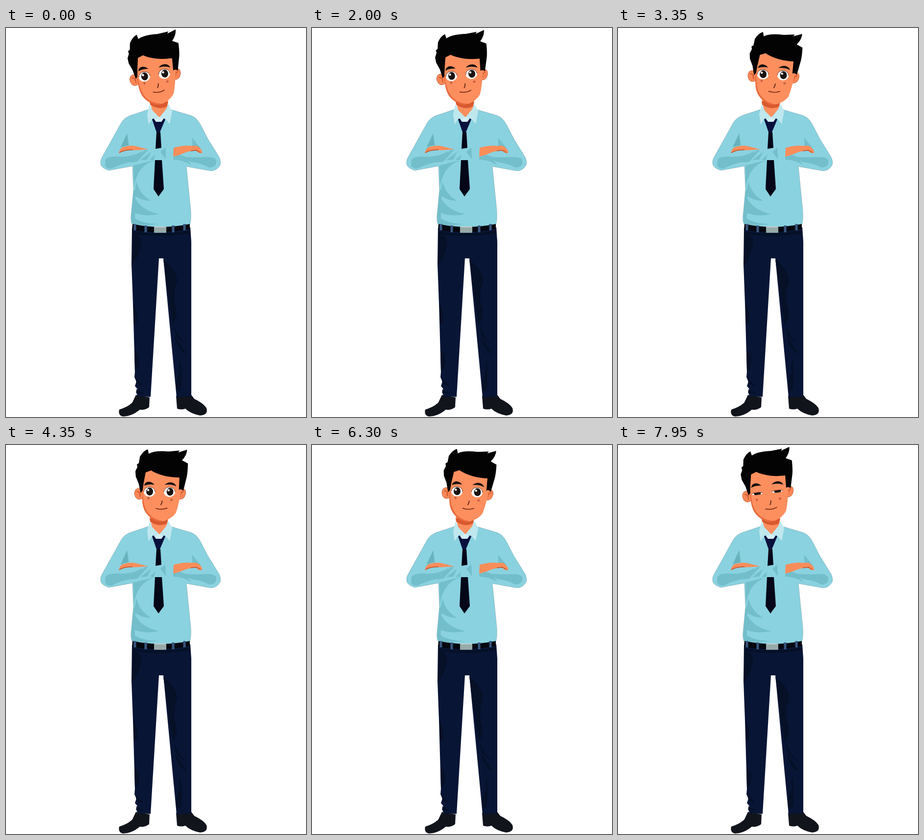
Animation of 612x792 px, one loop 8 s. Source, as an HTML page:

```html
<!DOCTYPE html>
<html lang="en">
<head>
<meta charset="utf-8">
<title>Man with crossed arms</title>
<style>
html, body { margin: 0; width: 100%; height: 100%; overflow: hidden; background: #fff; }
svg { display: block; width: 100%; height: 100%; }
</style>
</head>
<body>
<svg viewBox="0 0 612 792">
  <defs>
    <clipPath id="clipL"><ellipse class="lid" cx="292" cy="95.5" rx="11.5" ry="10"/></clipPath>
    <clipPath id="clipR"><ellipse class="lid" cx="333" cy="95.5" rx="11.5" ry="10"/></clipPath>
    <clipPath id="faceClip"><path d="M277 44V108C278 126 281 135 291 145C299 152 307 157 316 156C327 155 341 146 346 138C350 128 352 115 356 100V44Z"/></clipPath>
  </defs>

  <g id="shoes" fill="#12141c">
    <path d="M265 747L293 752L292 772Q283 779 273 777Q256 791 239 791Q228 789 231 777Q250 771 258 762Z"/>
    <path d="M347 749L378 747L384 755Q403 764 409 774Q413 788 396 789Q376 785 366 775Q358 778 349 775Z"/>
  </g>

  <g id="trousers">
    <path fill="#081535" d="M257 408L376 406L378 435V750L348 752L321 469H312L295 751L269 750L265 741L268 735L263 729L266 720L262 711L263 700L259 560L256 480Z"/>
    <g fill="#061026">
      <path d="M257 414Q315 424 376 412V418Q315 428 257 419Z"/>
      <path d="M257 419Q278 422 275 440Q270 470 257 482Z"/>
      <path d="M321 472Q350 495 349 517Q338 545 348 575Q350 592 340 604Z"/>
      <path d="M342 604Q348 625 365 642Q356 638 346 626Z"/>
      <path d="M345 628Q355 645 368 662Q360 664 347 640Z"/>
      <path d="M260 560Q270 575 267 600L261 602Z"/>
      <path d="M262 655Q276 668 270 690L263 700Z"/>
      <path d="M264 711Q272 722 280 727Q272 729 266 723ZM266 735Q272 740 282 743Q272 747 266 741Z"/>
      <path d="M347 740Q346 715 355 700Q352 685 356 675Q361 710 356 738Z"/>
    </g>
  </g>

  <g id="shirt">
    <path fill="#8ad2e0" stroke="#41636b" stroke-opacity=".45" stroke-width=".7" d="M290 166L254 178Q242 182 235 193L196 263Q191 271 194 280Q199 287 210 290L258 281L260 330L255 382Q254 393 257 399Q315 411 375 400Q378 393 377 372L368 282L418 291Q430 291 437 279Q439 272 435 263L412 226L397 197Q389 182 377 178L336 166Z"/>
    <g fill="#73becb">
      <path d="M233 244L247 214L251 239Q242 239 233 244Z"/>
      <path d="M380 240V223Q391 238 398 245Q390 241 380 240Z"/>
      <path d="M203 268Q210 260 232 262Q258 263 279 250L267 271Q240 274 216 286Q206 288 202 280Z"/>
      <path d="M254 274L283 249L290 248L268 272ZM274 269L296 252L288 268Z"/>
      <path d="M429 269Q424 261 402 263Q374 264 355 261L378 273Q402 276 414 284Q425 285 429 276Z"/>
      <path d="M341 263Q354 255 365 262L378 279Q360 268 341 268Z"/>
      <path d="M315 252L325 244L326 267ZM293 268L305 258L301 269Z"/>
      <path d="M260 280Q283 274 304 269Q277 278 268 300Q261 315 261 328Z"/>
      <path d="M266 312Q272 338 296 352Q276 352 261 340ZM263 345Q275 371 313 379Q282 385 261 376Z"/>
      <path d="M260 330H265Q262 370 263 388Q282 399 311 399Q278 404 257 398Q255 390 256 380Z"/>
    </g>
    <path fill="#67b2bd" d="M235 242L247 216L249 239Z"/>
    <g fill="#f98d5a">
      <path d="M230 255Q232 244 240 242Q256 237 270 242L290 247Q266 249 251 249Q240 250 230 255Z"/>
      <path d="M342 244Q360 238 380 240Q390 238 396 245Q401 250 400 255L393 254L386 249Q367 252 355 258L341 262Z"/>
    </g>
    <path d="M231 254Q240 248 258 248M377 250L389 249L397 254" fill="none" stroke="#b54f2c" stroke-width="1.4"/>
  </g>

  <g id="belt">
    <path fill="#05070f" d="M258 399Q315 411 375 399V409Q315 421 257 411Z"/>
    <rect x="302" y="404" width="25" height="13" rx="1" fill="#97aaa8"/>
    <path d="M303 405H326" stroke="#c0cecb" stroke-width="2"/>
    <path d="M263 399V412M285 402V416M341 402V416M364 399V412" stroke="#39577f" stroke-width="5"/>
  </g>

  <path fill="#fd8f5f" d="M293 146L331 146L329 163L313 183L298 168Z"/>
  <path fill="#d9592f" d="M293 149L331 150L328 160Q312 168 294 156Z"/>

  <g id="head">
    <g fill="#fd8655" stroke="#8a3b22" stroke-width=".6">
      <path d="M278 91Q270 86 264 91Q259 98 264 107Q269 114 278 109Z"/>
      <path d="M351 91Q359 85 365 91Q368 97 363 106Q358 112 350 109Z"/>
    </g>
    <path d="M266 95Q274 95 273 106M362 94Q355 96 355 105" fill="none" stroke="#c5552e" stroke-width="1.8"/>
    <g clip-path="url(#faceClip)">
      <path fill="#e9693c" d="M270 40H360V162H270Z"/>
      <path fill="#fd8f5f" d="M277 40H360V150Q330 160 316 154Q299 151 289 138Q280 126 279 104Z"/>
    </g>
    <path fill="#030304" d="M274 98L270 79L264 65L263 54L267 45L266 40L270 37L272 24Q279 12 288 9L290 18Q302 11 330 13L353 11L350 15L368 9Q368 20 358 31L370 37Q370 53 368 64L361 93Q357 88 352 91L353 66Q337 66 323 63Q304 58 295 52Q290 54 284 56L280 78L278 93Z"/>
    <path fill="#17100f" d="M281 83Q283 75 291 75Q298 76 302 81Q291 79 281 83ZM323 81Q330 75 337 76Q344 77 347 84Q336 79 323 81Z"/>
    <g id="eyes">
      <g clip-path="url(#clipL)">
        <path fill="#fff" d="M279 85H305V106H279Z"/>
        <ellipse cx="292.5" cy="95" rx="7" ry="8" fill="#1b1312"/>
        <circle cx="289.5" cy="92" r="2.3" fill="#fff"/>
      </g>
      <g clip-path="url(#clipR)">
        <path fill="#fff" d="M320 85H346V106H320Z"/>
        <ellipse cx="334" cy="95" rx="7" ry="8" fill="#1b1312"/>
        <circle cx="331" cy="92" r="2.3" fill="#fff"/>
      </g>
      <path class="lash" fill="none" stroke="#5a2618" stroke-width=".9"/>
      <path class="lash" fill="none" stroke="#5a2618" stroke-width=".9"/>
    </g>
    <path d="M318 113Q318 119 315 122" fill="none" stroke="#5c2014" stroke-width="1.8"/>
    <path d="M305 129Q318 133 329 128" fill="none" stroke="#7a2917" stroke-width="1.7"/>
    <path d="M287 108L291 107L289 112M290 109L292 110M335 110L337 114M339 109L335 113M338 111L340 113" fill="none" stroke="#a9482b" stroke-width="1.1"/>
  </g>

  <g id="collar" fill="#bfe8ee">
    <path d="M293 155L299 168L313 182L304 187L299 184L291 196L288 176Z"/>
    <path d="M331 154L327 165L313 182L320 187L324 184L334 195L339 169Z"/>
  </g>
  <g id="tie">
    <path fill="#d3f0f4" d="M302 187L313 181L321 187L317 192H306Z"/>
    <path fill="#07113c" d="M298 186L301 184L306 191H317L322 184L325 186L314 212H307Z"/>
    <path fill="#030718" d="M307 212H315L317 244L305 246ZM304 269H318L322 328L311 343L301 328Z"/>
  </g>
</svg>
<script>
const LOOP = 8000, STEP = 50, SWAY = 2950;
const head = document.getElementById('head');
const lids = document.querySelectorAll('.lid');
const lashes = document.querySelectorAll('.lash');

const clamp = v => Math.max(0, Math.min(1, v));
const ease = (t, a, b) => (1 - Math.cos(Math.PI * clamp((t - a) / (b - a)))) / 2;

// Quick tilt to the right, slow return, short rest on the left.
function tilt(p) {
  const s = ease(p, -100, 520) - ease(p, 800, 2500) + ease(p, SWAY - 100, SWAY + 520);
  return (-2 + 35 * s - 22) * 0.358;
}

function blink(p, start) {
  const d = p - start;
  return d < 0 ? 1 : Math.max(clamp(1 - d / 55), clamp((d - 80) / 100));
}

function render(t) {
  const p = t % SWAY;
  head.setAttribute('transform', `rotate(${tilt(p)} 313 168)`);
  const open = Math.min(blink(p, 980), blink(p, 2005));
  const ry = 0.8 + 9.2 * open;
  const cy = 95.5 + (1 - open);
  lids.forEach((lid, i) => {
    lid.setAttribute('ry', ry);
    lid.setAttribute('cy', cy);
    const x = i ? 333 : 292;
    lashes[i].setAttribute('d', `M${x - 11.5} ${cy}A11.5 ${ry} 0 0 1 ${x + 11.5} ${cy}`);
  });
}

const begin = performance.now();
function tick() {
  const t = (performance.now() - begin) % LOOP;
  render(Math.floor(t / STEP) * STEP);
  requestAnimationFrame(tick);
}
render(0);
requestAnimationFrame(tick);
</script>
</body>
</html>
```
